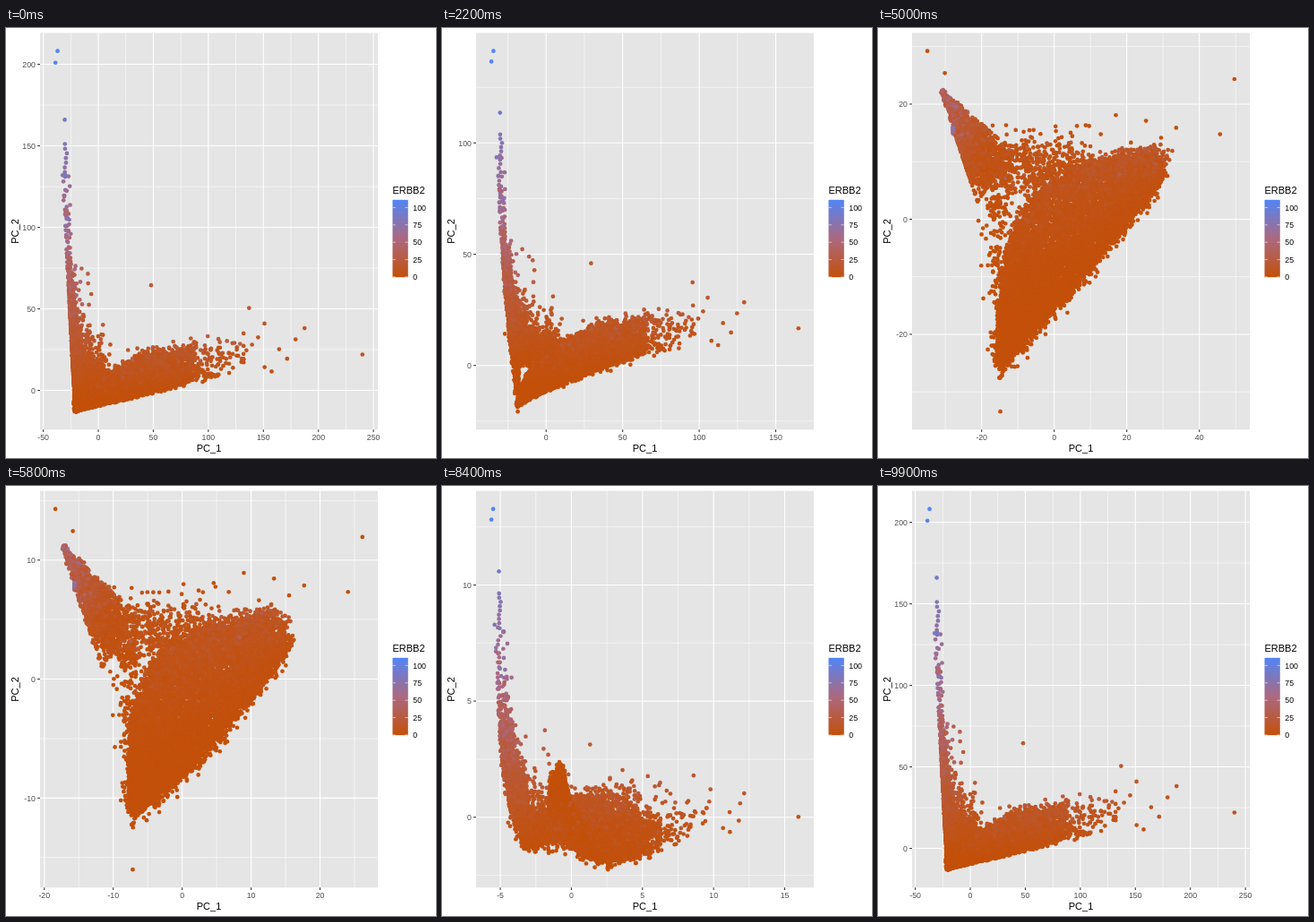
An HTML page with a canvas that plays this animation: 480x480 px, repeating every 10 s.

```html
<!DOCTYPE html>
<html lang="en">
<head>
<meta charset="utf-8">
<title>PCA scatter</title>
<style>
html, body { margin: 0; width: 100%; height: 100%; overflow: hidden; background: #fff; }
canvas { display: block; }
</style>
</head>
<body>
<canvas id="plot" width="480" height="480"></canvas>
<script>
const ctx = document.getElementById('plot').getContext('2d');
const FONT = '"Liberation Sans", Arial, sans-serif';
const panel = { l: 38, t: 5.5, r: 415, b: 448.3 };
const RADIUS = 2.35;

// Seeded random numbers
let seed = 20177;
function rnd() {
  seed = (seed + 0x6D2B79F5) | 0;
  let t = Math.imul(seed ^ (seed >>> 15), 1 | seed);
  t = (t + Math.imul(t ^ (t >>> 7), 61 | t)) ^ t;
  return ((t ^ (t >>> 14)) >>> 0) / 4294967296;
}
const gauss = () => Math.sqrt(-2 * Math.log(1 - rnd())) * Math.cos(2 * Math.PI * rnd());
const jitter = () => 0.65 * gauss() * Math.exp(0.45 * gauss());
const lerp = (a, b, k) => a + (b - a) * k;
const clamp = (v, lo, hi) => Math.min(hi, Math.max(lo, v));
const bezier = (a, b, c, d, t) => {
  const s = 1 - t;
  return s * s * s * a + 3 * s * s * t * b + 3 * s * t * t * c + t * t * t * d;
};

// Colour scale from low through middle to high
const low = [195, 80, 10], mid = [171, 104, 128], high = [82, 133, 246];
function shade(k) {
  const [from, to, f] = k < 0.5 ? [low, mid, k * 2] : [mid, high, k * 2 - 1];
  return `rgb(${from.map((v, j) => Math.round(lerp(v, to[j], f)))})`;
}
const palette = Array.from({ length: 111 }, (_, i) => shade(i / 110));

// Each cell has a place in three layouts: a raw, b normalised, c scaled
const cells = [];
function add(a, b, c, value) {
  cells.push({ pos: [a, b, c], color: palette[Math.round(clamp(value, 0, 110))], order: rnd() });
}
function addCell(a, b, c, gain, extra = 0) {
  a = [clamp(a[0], -34, 132), clamp(a[1], -13, 132)];
  b = [clamp(b[0] * 1.06, -33.5, 36), clamp(b[1] * 1.06, -29.5, 25)];
  c = [clamp(c[0], -3.6, 2.4), clamp(c[1], -2.1, 3.4)];
  add(a, b, c, (a[1] + 5) * gain * (0.6 + 0.6 * rnd()) + extra);
}

// Main fan: u runs from the low corner to the right end, v from lower to upper edge
function addFan() {
  const u = clamp(rnd() + 0.02 * gauss(), 0, 1.04), v = Math.pow(rnd(), 1.1);
  const f = 1 - Math.pow(Math.max(0, 1 - u), 3);
  const ax = -20 + 25 * u + 60 * u * u * Math.exp(0.33 * gauss());
  const ay = -12.8 + 0.15 * (ax + 20) + Math.pow(u, 0.65) * 22 * v + 4 * u * Math.abs(gauss());
  const bx = lerp(lerp(-14, 29, u), bezier(-15, -16, -8, 28.5, u), v);
  const by = lerp(lerp(-25, 6.5, u) - 4 * u * (1 - u), bezier(-25, 2, 9, 12, u), v);
  const cx = 0.5 + f * lerp(0.9, -2.4, v);
  const cy = 3.15 - f * (3.7 + 1.5 * rnd()) + 0.25 * Math.max(0, -cx);
  addCell([ax + 0.4 * gauss(), ay], [bx + jitter(), by + jitter()],
    [cx + 0.08 * gauss(), cy + 0.08 * gauss()], 0.35, 26 * v * u * rnd() * rnd());
}

// Left cone: w runs from its broad base to the tip, p across it
function addCone() {
  const w = clamp(0.4 + 0.26 * gauss(), -0.1, 1.02), p = clamp(gauss() / 2, -1, 1.2);
  const half = 5 * (1 - w) + 0.4, h = Math.max(0, w);
  const ay = -6 + 16 * rnd() + 18 * h + 50 * Math.pow(h, 1.5) * Math.exp(0.46 * gauss());
  const spread = Math.abs(gauss()) * (2 + 10 * (1 - h) * Math.max(0, p + 0.3));
  addCell([-22 - 0.08 * ay + spread, ay],
    [lerp(-18, -30.5, w) + 0.73 * half * p, lerp(8.5, 22, w) + 0.68 * half * p],
    [-2 - 1.6 * h + 0.25 * gauss(), -0.95 + 0.9 * h + 0.2 * gauss()], 0.58);
}

// Sparse bridge between the two groups
function addBridge() {
  const t = Math.pow(rnd(), 1.3);
  addCell([-19 + 20 * t + 5 * Math.abs(gauss()), 11 * Math.exp(0.6 * gauss()) - 3],
    [lerp(-17, 9, t) + gauss(), 9 + 2.6 * gauss()],
    [-2 + 2 * t + 0.3 * gauss(), -1.1 + 0.3 * gauss()], 0.4);
}

// Loose cells beside the left edge of the fan
function addEdge() {
  const y = lerp(-18, 4, Math.sqrt(rnd()));
  addCell([-20.5 + gauss(), -7 + 3 * gauss()], [-16 + 1.7 * gauss(), y],
    [0.1 - 0.3 * rnd(), 1.5 - 0.06 * y], 0.2);
}

// Far cells of each arm, and cells far out in the normalised layout
const farLeft = (x, y) =>
  add([x, y], [-29.4 + (x + 31) * 0.05, 17.5 + (y - 166) * 0.03], [-3.4, y / 750], y * 0.53);
const farRight = (x, y) =>
  add([x, y], [27.5 - (y - 20) * 0.25, 6.5 + (y - 20) * 0.22], [1.1 - (y - 20) * 0.035, -1.45], y * 0.4);
const farOut = (x, y) =>
  add([x / 5 - 14, 5], [x, y], [x / 20, 0.4 - y / 30], 0);

function repeat(n, make) {
  for (let i = 0; i < n; i++) make(i / n);
}
repeat(10000, addFan);
repeat(2300, addCone);
repeat(600, addBridge);
repeat(110, addEdge);
repeat(16, k => farLeft(-30 + 2.5 * gauss() * (1 - k / 2), 108 + 46 * k));
repeat(20, k => farRight(108 + 88 * k * k, 22 + 6 * gauss()));
repeat(10, k => farOut(lerp(-4, 40, k), 17 + 1.3 * gauss()));

farLeft(-37, 208.2);
farLeft(-39, 201);
farLeft(-30.5, 166);
farRight(240, 22);
farRight(137, 50.5);
farRight(151, 41);
farOut(-37, 31.1);
farOut(-31.9, 27);
farOut(48.4, 15.7);
farOut(52.6, 25.9);
add([-20, -12.6], [-15.8, -35.6], [0.5, 1.4], 0);
add([48, 64.5], [-4.8, 11.8], [-1.8, -0.96], 22);

cells.sort((p, q) => p.order - q.order);

// Axis steps: best balance of simplicity, coverage and density near five labels
function axisStep(lo, hi) {
  const nice = [1, 5, 2, 2.5, 4, 3], span = hi - lo;
  let best = -Infinity, pick = 1;
  const base = Math.floor(Math.log10(span));
  for (let e = base - 1; e <= base; e++) nice.forEach((q, i) => {
    const step = q * Math.pow(10, e);
    if (span / step > 14) return;
    const first = Math.floor(lo / step) - 1, last = Math.ceil(hi / step) + 1;
    for (let s = first; s < last; s++) for (let t = s + 1; t <= last; t++) {
      const a = s * step, b = t * step;
      const simple = (s <= 0 && t >= 0 ? 1 : 0) - i / 5;
      const cover = 1 - 0.5 * ((hi - b) ** 2 + (lo - a) ** 2) / (0.1 * span) ** 2;
      const r = 1 / step, want = 4 / (Math.max(b, hi) - Math.min(a, lo));
      const dense = 2 - Math.max(r / want, want / r);
      const score = 0.25 * simple + 0.2 * cover + 0.5 * dense;
      if (score > best) { best = score; pick = step; }
    }
  });
  return pick;
}

function text(s, x, y, size, color, align) {
  ctx.font = `${size}px ${FONT}`;
  ctx.fillStyle = color;
  ctx.textAlign = align;
  ctx.fillText(s, x, y);
}

function line(x1, y1, x2, y2, color, width) {
  ctx.strokeStyle = color;
  ctx.lineWidth = width;
  ctx.beginPath();
  ctx.moveTo(x1, y1);
  ctx.lineTo(x2, y2);
  ctx.stroke();
}

function drawAxis({ lo, hi, step, map, flat }, minor) {
  const digits = Number.isInteger(step) ? 0 : 1;
  const shift = minor ? 0.5 : 0, width = minor ? 0.55 : 1.1;
  for (let i = Math.ceil(lo / step - shift); (i + shift) * step <= hi; i++) {
    const v = (i + shift) * step, p = map(v);
    if (flat) line(p, panel.t, p, panel.b, '#fff', width);
    else line(panel.l, p, panel.r, p, '#fff', width);
    if (minor) continue;
    const label = (i === 0 ? 0 : v).toFixed(digits);
    if (flat) {
      line(p, panel.b, p, panel.b + 2.8, '#333', 1.07);
      text(label, p, 460, 8.8, '#4d4d4d', 'center');
    } else {
      line(panel.l - 2.8, p, panel.l, p, '#333', 1.07);
      text(label, 33, p + 3.2, 8.8, '#4d4d4d', 'right');
    }
  }
}

function drawLegend() {
  const x = 431.5, top = 191.8, h = 86.4, w = 17.3;
  text('ERBB2', x, 185, 11, '#000', 'left');
  const g = ctx.createLinearGradient(0, top + h, 0, top);
  for (const k of [0, 0.5, 1]) g.addColorStop(k, shade(k));
  ctx.fillStyle = g;
  ctx.fillRect(x, top, w, h);
  for (let v = 0; v <= 100; v += 25) {
    const y = 277.9 - v * 0.775;
    line(x, y, x + 3.5, y, '#fff', 0.55);
    line(x + w - 3.5, y, x + w, y, '#fff', 0.55);
    text(String(v), 454.3, y + 3.2, 8.8, '#000', 'left');
  }
}

// Layout pair and blend for each tenth of a second
function phase(n) {
  if (n < 33) return [0, 1, clamp((n - 16) / 17, 0, 1)];
  if (n < 66) return [1, 2, clamp((n - 49) / 17, 0, 1)];
  return [2, 0, clamp((n - 83) / 16, 0, 1)];
}

// The view follows the data with a margin of five percent
function makeAxis(values, from, to, flat) {
  let min = Infinity, max = -Infinity;
  for (const v of values) {
    if (v < min) min = v;
    if (v > max) max = v;
  }
  const pad = (max - min) * 0.05, lo = min - pad, hi = max + pad;
  const map = v => lerp(from, to, (v - lo) / (hi - lo));
  return { lo, hi, map, flat, step: axisStep(lo, hi) };
}

function draw(n) {
  const [from, to, k] = phase(n);
  const coord = d => cells.map(c => lerp(c.pos[from][d], c.pos[to][d], k));
  const xs = coord(0), ys = coord(1);
  const ax = makeAxis(xs, panel.l, panel.r, true);
  const ay = makeAxis(ys, panel.b, panel.t, false);

  ctx.fillStyle = '#fff';
  ctx.fillRect(0, 0, 480, 480);
  ctx.fillStyle = '#e5e5e5';
  ctx.fillRect(panel.l, panel.t, panel.r - panel.l, panel.b - panel.t);
  for (const minor of [true, false]) {
    drawAxis(ax, minor);
    drawAxis(ay, minor);
  }
  cells.forEach((c, i) => {
    ctx.fillStyle = c.color;
    ctx.beginPath();
    ctx.arc(ax.map(xs[i]), ay.map(ys[i]), RADIUS, 0, 2 * Math.PI);
    ctx.fill();
  });

  text('PC_1', 226.5, 472.5, 11, '#000', 'center');
  ctx.save();
  ctx.translate(13.5, 227);
  ctx.rotate(-Math.PI / 2);
  text('PC_2', 0, 0, 11, '#000', 'center');
  ctx.restore();
  drawLegend();
}

let shown = -1;
function tick() {
  const n = Math.floor(performance.now() / 100) % 100;
  if (n !== shown) draw(shown = n);
  requestAnimationFrame(tick);
}
tick();
</script>
</body>
</html>
```
